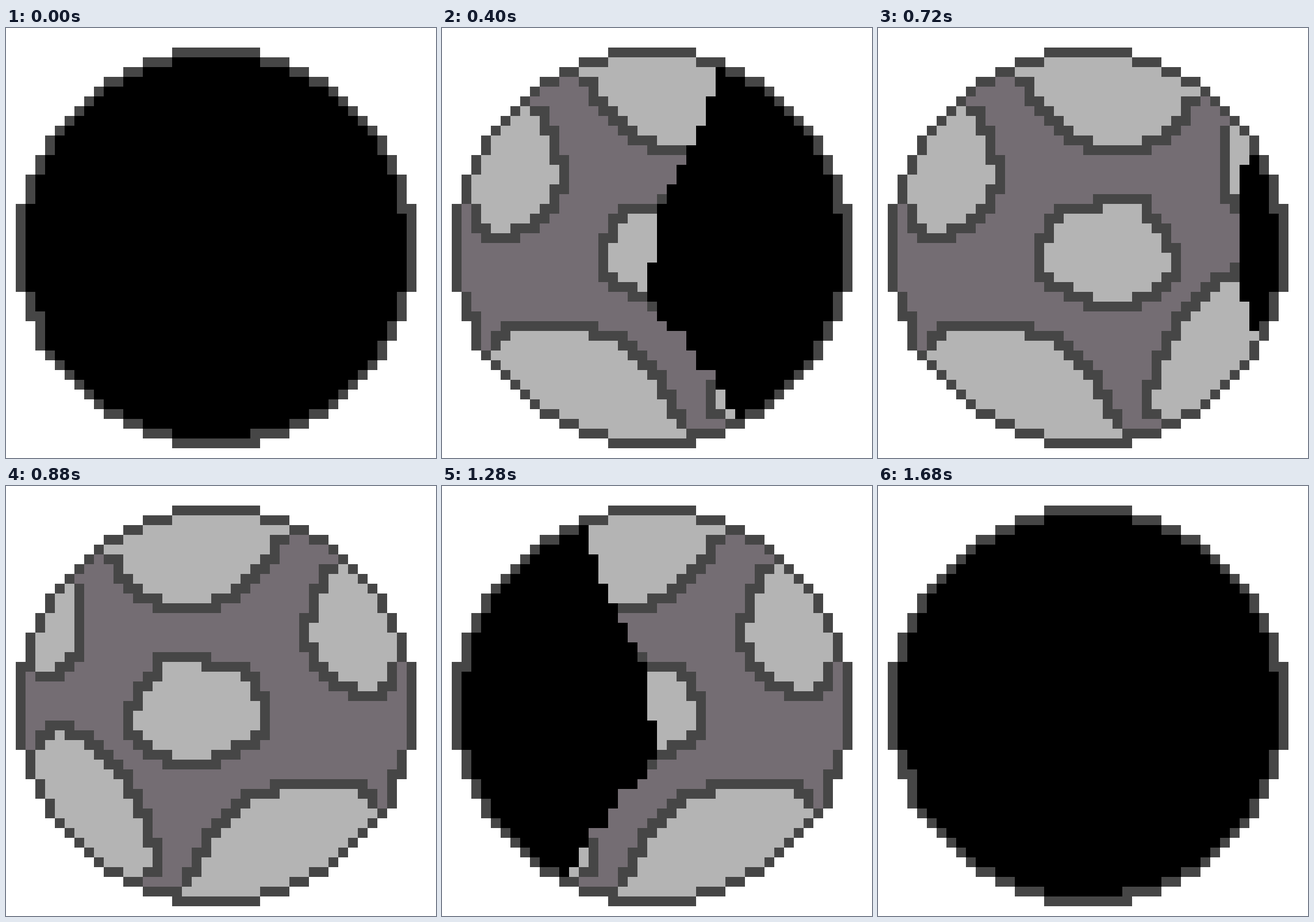
Recreate the animation shown at these times as an HTML page. Size 748 by 748 pixels, loop 1.76 s.

```html
<!DOCTYPE html>
<html lang="en">
<head>
<meta charset="utf-8">
<title>Moon phases</title>
<style>
  html, body { margin: 0; width: 100%; height: 100%; overflow: hidden; background: #fff; }
  svg { display: block; width: 100vw; height: 100vh; }
</style>
</head>
<body>
<svg viewBox="0 0 44 44" shape-rendering="crispEdges">
  <path id="rim" fill="#464646"/>
  <path id="rock" fill="#746d73"/>
  <path id="pale" fill="#b4b4b4"/>
  <path id="dark" fill="#000"/>
</svg>
<script>
const SIZE = 44, CX = 21, CY = 22, STEP = 80, STEPS = 22;
const SIDES = [[1, 0], [-1, 0], [0, 1], [0, -1]];
const CORNERS = [[1, 1], [1, -1], [-1, 1], [-1, -1]];

const key = (x, y) => y * SIZE + x;
const lerp = (a, b, t) => a + (b - a) * t;
const points = text => text.split(' ').map(p => p.split(',').map(Number));

function eachCell(visit) {
  for (let y = 0; y < SIZE; y++) for (let x = 0; x < SIZE; x++) visit(x, y);
}

// Disc with a one-cell rim and a few nicks along it
const inDisc = (x, y) => (x - CX) ** 2 + (y - CY) ** 2 <= 380 || (x === 4 && y === 32);
const rim = new Set([key(40, 18), key(3, 29), key(25, 41)]);
eachCell((x, y) => {
  if (!inDisc(x, y) && SIDES.some(([i, j]) => inDisc(x + i, y + j))) rim.add(key(x, y));
});
const inside = (x, y) => inDisc(x, y) && !rim.has(key(x, y));

// Crater outlines by their corners; the disc cuts off what lies beyond it.
const craters = [
  '11,2 15.1,5 19.5,10 22,11.3 26,11.3 28.5,10 30.9,7 34,5.8 34,2',
  '1,7.5 8.4,7.5 11.4,14 10.3,17 8.4,19 6,20.3 4.6,20.3 3.2,18 1,16',
  '23.2,17.8 26.1,17.8 29.9,24 27.2,26 25,27.3 22,27.3 17.9,25 16.9,24 16.6,22 18.6,19',
  '7,30.7 13.6,30.7 17.2,32 21.2,36 25.15,43 4,43 4,33.7',
  '35.5,9.7 43,9.7 43,18.3 38,18.3 35.5,16',
  '37.1,24.7 41,27.5 43,39.3 29,39.3 27.26,38 30.7,30 34.7,26'
].map(points);

function contains(shape, x, y) {
  let hit = false;
  shape.forEach(([ax, ay], i) => {
    const [bx, by] = shape[(i + 1) % shape.length];
    if (ay > y !== by > y && x < lerp(ax, bx, (y - ay) / (by - ay))) hit = !hit;
  });
  return hit;
}

const isCrater = (x, y) => inside(x, y) && craters.some(shape => contains(shape, x, y));
const isEdge = (x, y) =>
  SIDES.some(([i, j]) => isCrater(x + i, y + j)) ||
  CORNERS.some(([i, j]) => isCrater(x + i, y + j) && inside(x + i, y) && inside(x, y + j));

function surface(x, y) {
  if (rim.has(key(x, y))) return 'rim';
  if (isCrater(x, y)) return 'pale';
  return isEdge(x, y) ? 'rim' : 'rock';
}

const cells = [];
eachCell((x, y) => {
  const open = inside(x, y);
  if (open || rim.has(key(x, y))) cells.push({ x, y, open, tone: surface(x, y) });
});

// Shadow edge: from the left limb through two curves, then off to the right
const early = points('23.6,3 24.7,5 20.5,12 15.9,18 13.9,24 13.1,26 14.8,29 17.1,31 18.95,35 22,41');
const late = points('33.2,3 30.1,13 29.2,20 30.3,30 32.1,31 34.5,34 37,35 40,41');

function along(curve, y) {
  const i = Math.max(1, curve.findIndex(p => p[1] >= y));
  const [ax, ay] = curve[i - 1], [bx, by] = curve[i];
  return Math.floor(lerp(ax, bx, (y - ay) / (by - ay)));
}

function shadowStart(y, step) {
  const limb = CX - Math.floor(Math.sqrt(380 - (y - CY) ** 2));
  const a = along(early, y), b = along(late, y);
  if (step === 0) return 0;
  if (step <= 3) return Math.round(lerp(limb, a, step / 3));
  if (step <= 7) return Math.round(lerp(a, b, (step - 3) / 4));
  return b + 4 * (step - 7);
}

// The second half is the first one mirrored and reversed.
function draw(index) {
  const flip = index > 10 && index < STEPS - 1;
  const step = index > 10 ? STEPS - 1 - index : index;
  const paths = { rim: '', rock: '', pale: '', dark: '' };
  for (const { x, y, open, tone } of cells) {
    const shade = open && x >= shadowStart(y, step) ? 'dark' : tone;
    paths[shade] += `M${flip ? 2 * CX - x : x} ${y}h1v1h-1z`;
  }
  for (const id in paths) document.getElementById(id).setAttribute('d', paths[id]);
}

let shown = -1;
function tick() {
  const index = Math.floor(performance.now() / STEP) % STEPS;
  if (index !== shown) draw(shown = index);
  requestAnimationFrame(tick);
}
tick();
</script>
</body>
</html>
```
